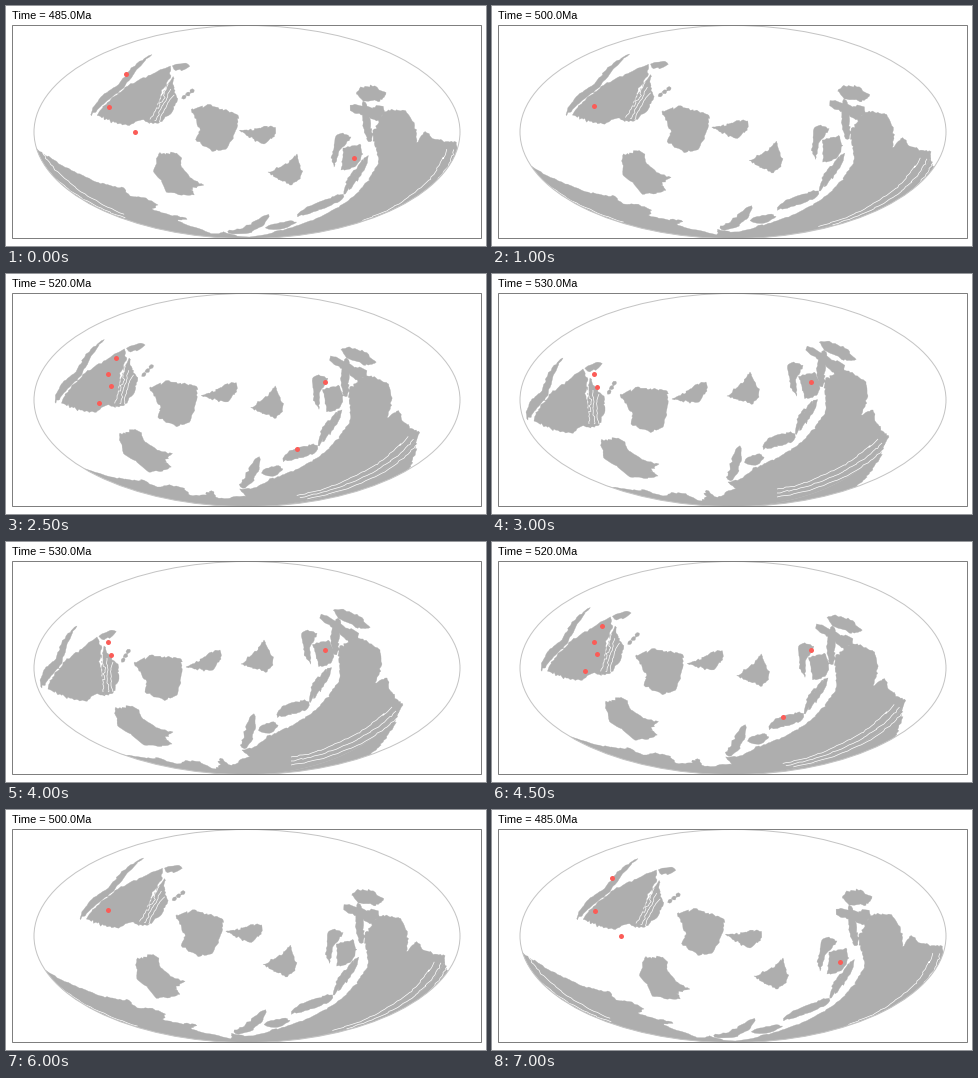
Animation of 480 by 240 pixels, one loop 7500 ms. Source, as a matplotlib script:

```python
import matplotlib.pyplot as plt
import numpy as np
from matplotlib.animation import FuncAnimation
from matplotlib.collections import LineCollection, PolyCollection
from matplotlib.patches import Ellipse, Rectangle

W, H, DPI = 480, 240, 100
PX = 72 / DPI
CX, CY, A, B = 241, 126, 213, 106.5
STEPS = [485, 490, 500, 510, 515, 520, 530, 540]
KEY_AGES = [485, 510, 530]
PEAK = len(STEPS) - 1
LAND, RED = "#aeaeae", "#fb5c57"

rng = np.random.default_rng(4)
THETA = np.linspace(-np.pi / 2, np.pi / 2, 4001)
SIN_LAT = (2 * THETA + np.sin(2 * THETA)) / np.pi


def unit(v):
    return v / np.linalg.norm(v, axis=-1, keepdims=True)


def to_sphere(points):
    """Stage pixels to unit vectors (inverse Mollweide)."""
    x, y = np.reshape(points, (-1, 2)).astype(float).T
    t = np.arcsin(np.clip((CY - y) / B, -1, 1))
    sin_lat = np.interp(t, THETA, SIN_LAT)
    cos_lat = np.sqrt(1 - sin_lat ** 2)
    lon = np.pi * (x - CX) / A / np.cos(t)
    return np.column_stack([cos_lat * np.cos(lon), cos_lat * np.sin(lon), sin_lat])


def to_stage(lon, sin_lat):
    t = np.interp(sin_lat, SIN_LAT, THETA)
    return np.column_stack([CX + A * lon / np.pi * np.cos(t), CY - B * np.sin(t)])


def basis(markers):
    """Orthonormal frame of a plate from two marker pixels."""
    p, q = to_sphere(markers)
    mid, along = unit(p + q), unit(q - p)
    return np.column_stack([mid, along, np.cross(mid, along)])


def partial_turn(r, f):
    """Fraction f of the rotation r."""
    angle = np.arccos(np.clip((np.trace(r) - 1) / 2, -1, 1))
    k = (r - r.T) / (2 * np.sin(angle))
    return np.eye(3) + np.sin(f * angle) * k + (1 - np.cos(f * angle)) * k @ k


def roughen(v, step=0.025, amount=0.008):
    """Ragged great-circle line through the given vectors."""
    out = []
    for p, q in zip(v[:-1], v[1:]):
        n = max(1, int(np.linalg.norm(q - p) / step))
        seg = p + (q - p) * (np.arange(n) / n)[:, None]
        seg[1:] += rng.normal(0, amount, (n - 1, 3))
        out.append(seg)
    return unit(np.vstack(out + [v[-1:]]))


class Plate:
    """Rigid piece of crust, turned on the sphere between key ages."""

    def __init__(self, *keys):
        self.keys = [basis(k) for k in keys]
        self.shapes, self.cracks = [], []

    def pose(self, age):
        i = 0 if age < KEY_AGES[1] else 1
        a0, a1 = KEY_AGES[i:i + 2]
        f0, f1 = self.keys[i:i + 2]
        return partial_turn(f1 @ f0.T, (age - a0) / (a1 - a0)) @ f0

    def body(self, age, points):
        return to_sphere(points) @ self.pose(age)

    def land(self, *parts):
        """Closed outline, given as (age, flat pixel list) parts."""
        v = np.vstack([self.body(*part) for part in parts])
        self.shapes.append(roughen(np.vstack([v, v[:1]])))

    def island(self, age, x, y, length, width, tilt):
        t = np.arange(0, 2 * np.pi, np.pi / 6)
        r = rng.uniform(0.8, 1.15, t.size)
        u, v = length / 2 * r * np.cos(t), width / 2 * r * np.sin(t)
        c, s = np.cos(np.radians(tilt)), np.sin(np.radians(tilt))
        self.land((age, np.column_stack([x + u * c - v * s, y + u * s + v * c])))

    def crack(self, age, points):
        self.cracks.append(roughen(self.body(age, points)))


def project(v, closed=True):
    """Copies of a line on the map, one per turn of longitude."""
    lon = np.unwrap(np.arctan2(v[:, 1], v[:, 0]))
    sin_lat = v[:, 2]
    if closed and abs(lon[-1] - lon[0]) > np.pi:  # ring around the south pole
        down = np.linspace(np.arcsin(sin_lat[0]), -np.pi / 2, 60)
        lon = np.r_[lon, np.full(60, lon[-1]), np.full(60, lon[0])]
        sin_lat = np.r_[sin_lat, np.sin(down), np.sin(down[::-1])]
    return [to_stage(lon + 2 * np.pi * k, sin_lat) for k in range(-2, 3)]


laurentia = Plate([84, 109, 175, 61], [66, 109, 162, 58], [34, 145, 102, 93])
laurentia.land((530, [71, 84, 60, 94, 50, 117, 40, 125, 34, 138, 36, 146,
                      47, 132, 56, 121, 64, 97]))
laurentia.land((530, [42, 147, 50, 130, 62, 117, 76, 107, 91, 95, 96, 106, 94, 122,
                      98, 140, 99, 154, 90, 152, 79, 159, 62, 155]))
laurentia.land((530, [98, 104, 104, 115, 112, 122, 113, 137, 107, 151, 99, 153,
                      96, 130]))
laurentia.island(485, 175, 61, 17, 7, -5)
for k in range(3):
    laurentia.island(485, 178 + 4 * k, 91 - 3 * k, 5, 4, -30)
    laurentia.crack(530, [95 + 6 * k, 112 + 4 * k, 99 + 3 * k, 128, 97 + 5 * k, 150])

siberia = Plate([185, 103, 209, 146], [160, 108, 185, 147], [128, 121, 161, 158])
siberia.land((530, [128, 121, 147, 113, 155, 115, 175, 117, 176, 130, 171, 153,
                    160, 158, 139, 150, 141, 140, 133, 129]))

baltica = Plate([232, 124, 268, 130], [211, 120, 244, 120], [180, 125, 213, 117])
baltica.land((530, [180, 125, 194, 119, 203, 111, 214, 108, 215, 117, 207, 128,
                    190, 127]))

wedge = Plate([291, 148, 262, 166], [279, 127, 254, 146], [258, 98, 235, 122])
wedge.land((530, [235, 122, 252, 108, 258, 98, 267, 117, 267, 123, 261, 130,
                  244, 125]))

southwest = Plate([154, 150, 187, 186], [115, 152, 167, 182], [108, 166, 167, 201])
southwest.land((530, [109, 167, 126, 164, 133, 168, 137, 177, 152, 186, 167, 190,
                      158, 197, 166, 202, 138, 203, 125, 192, 113, 185]))

cathay = Plate([331, 128, 342, 165], [318, 117, 334, 150], [297, 91, 319, 124])
cathay.land((485, [330, 130, 337, 127, 345, 131, 333, 145, 328, 161, 325, 152]))
cathay.land((485, [337, 142, 354, 138, 357, 148, 352, 157, 344, 163, 335, 164]))

gondwana = Plate([383, 104, 450, 136], [373, 105, 431, 152], [357, 97, 397, 163])
gondwana.land(
    (485, [30, 142, 57, 160, 78, 170, 90, 176, 118, 182, 124, 190, 140, 192,
           152, 199, 146, 203, 180, 212, 172, 215, 197, 224]),
    (530, [244, 215, 236, 208, 248, 205, 264, 193, 292, 180, 310, 168, 326, 149,
           333, 140, 332, 107, 345, 97, 357, 97, 374, 108, 376, 122, 369, 141,
           381, 136, 383, 147, 397, 163]))
for island in [(243, 190, 34, 10, -75), (262, 186, 19, 11, -15), (288, 166, 38, 12, -20),
               (344, 76, 40, 12, 25), (327, 82, 34, 8, 32), (344, 92, 20, 12, 15)]:
    gondwana.island(530, *island)
gondwana.island(485, 361, 118, 44, 8, 80)
for k in range(3):
    gondwana.island(485, 344 + 6 * k, 175 - 6 * k, 30, 5, -65)
    gondwana.crack(530, [386 + 4 * k, 165 + 4 * k, 352, 191 + 6 * k, 285, 215 + 4 * k])

PLATES = [laurentia, siberia, baltica, wedge, southwest, cathay, gondwana]

DOTS = {
    485: [(120, 68), (103, 101), (129, 126), (348, 152)],
    490: [(103, 101)],
    500: [(102, 100)],
    510: [(116, 64), (119, 72), (98, 82), (102, 82), (102, 100), (98, 112), (105, 113),
          (177, 128), (279, 138), (221, 223), (223, 224), (229, 224), (252, 225)],
    515: [(102, 100), (105, 112)],
    520: [(110, 84), (102, 100), (105, 112), (93, 129), (319, 108), (291, 175)],
    530: [(102, 100), (105, 113), (319, 108)],
    540: [(102, 100), (105, 113)],
}

fig = plt.figure(figsize=(W / DPI, H / DPI), dpi=DPI, facecolor="white")
ax = fig.add_axes([0, 0, 1, 1])
ax.set(xlim=(0, W), ylim=(H, 0))
ax.axis("off")

globe = Ellipse((CX, CY), 2 * A, 2 * B, fill=False, ec="#c4c4c4", lw=PX, zorder=3)
ax.add_patch(globe)
ax.add_patch(Rectangle((6.5, 19.5), 469, 213, fill=False, ec="#7f7f7f", lw=PX,
                       snap=False, zorder=5))
title = ax.text(6.5, 13, "", family="Liberation Sans", size=11 * PX, va="baseline")

land = PolyCollection([], facecolor=LAND, edgecolor=LAND, lw=0.25)
cracks = LineCollection([], colors="white", lw=0.7 * PX, zorder=2)
for layer in (land, cracks):
    ax.add_collection(layer, autolim=False)
    layer.set_clip_path(globe)
dots = ax.scatter([], [], s=(5 * PX) ** 2, color=RED, lw=0, zorder=4)


def draw(n):
    age = STEPS[PEAK - abs(PEAK - n)]
    polys, lines = [], []
    for plate in PLATES:
        turn = plate.pose(age).T
        for v in plate.shapes:
            polys += project(v @ turn)
        for v in plate.cracks:
            lines += project(v @ turn, closed=False)
    land.set_verts(polys)
    cracks.set_segments(lines)
    dots.set_offsets(DOTS[age])
    title.set_text(f"Time = {age:.1f}Ma")
    return land, cracks, dots, title


anim = FuncAnimation(fig, draw, frames=2 * PEAK + 1, interval=500, repeat=True,
                     repeat_delay=0, blit=False)
plt.show()
```
